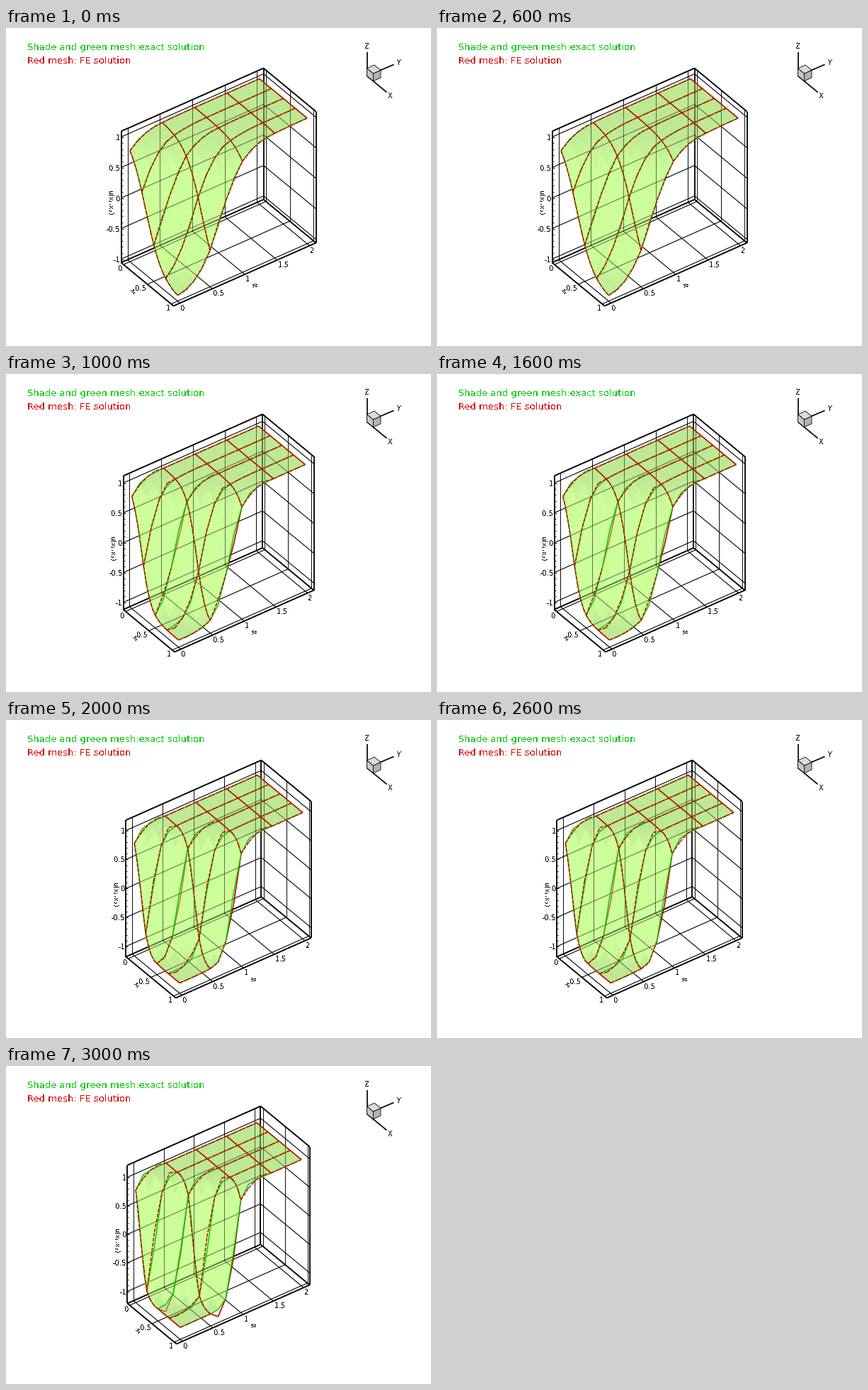
A matplotlib script for the animation above (4 s loop, 600 px wide and 448 px high).

```python
import numpy as np
import matplotlib.pyplot as plt
from matplotlib.animation import FuncAnimation
from matplotlib.collections import LineCollection, PolyCollection

WIDTH, HEIGHT, DPI = 600, 448, 64
PX = 72 / DPI
RED, GREEN = (0.84, 0, 0), (0, 0.8, 0)
SHADE = np.array([0.6, 1.0, 0.2])
DASHES = (0, (3.5, 1.2))

# steepness of the front, view scale, middle of the vertical range
STATES = [(3, 1.0, 0.018), (5, 0.978, 0), (7, 0.95, 0), (9, 0.935, 0)]
X1_LIMITS, X2_LIMITS = (-0.05, 1.05), (-0.1, 2.1)
X1_TICKS, X2_TICKS = np.linspace(0, 1, 3), np.linspace(0, 2, 5)
Z_TICKS = np.linspace(-1, 1, 5)

plt.rcParams["font.family"] = "DejaVu Sans"
plt.rcParams["text.antialiased"] = False

fig = plt.figure(figsize=(WIDTH / DPI, HEIGHT / DPI), dpi=DPI, facecolor="white")
ax = fig.add_axes([0, 0, 1, 1])


def make_projection(scale, z_mid):
    """Return the 3D-to-pixel mapping and the vertical limits of the box."""
    height = 335 - 150 * scale
    left = 299.5 - 137.5 * scale
    middle = 391 - 61 * scale - height / 2

    def project(x1, x2, z):
        u, v = x1 - X1_LIMITS[0], x2 - X2_LIMITS[0]
        x = left + scale * (67.3 * u + 91.4 * v)
        y = middle + scale * (55.5 * u - 40.4 * v - 86 * (z - z_mid))
        return np.stack(np.broadcast_arrays(x, y), axis=-1)

    half = height / (172 * scale)
    return project, (z_mid - half, z_mid + half)


def lines(segments, color, width, zorder, style="solid", alpha=1):
    if len(segments):
        ax.add_collection(LineCollection(
            segments, colors=[color], linewidths=width * PX, linestyles=style,
            alpha=alpha, zorder=zorder, capstyle="butt"))


def label(x, y, text, size=10, color="black", **kwargs):
    kwargs.setdefault("va", "baseline")
    ax.text(x, y, text, fontsize=size * PX, color=color, zorder=9, **kwargs)


def quadratic(values):
    """Piecewise quadratic through the ends and middle of each element."""
    a, m, b = values[:-1:4], values[2::4], values[4::4]
    result = values.copy()
    result[1::4] = 0.375 * a + 0.75 * m - 0.125 * b
    result[3::4] = -0.125 * a + 0.75 * m + 0.375 * b
    return result


def draw_box(project, z_limits):
    (a0, a1), (b0, b1), (z0, z1) = X1_LIMITS, X2_LIMITS, z_limits

    def edge(p, q):
        return [project(*p), project(*q)]

    grid = []
    for t in X1_TICKS:
        grid += [edge((t, b1, z0), (t, b1, z1)), edge((t, b0, z0), (t, b1, z0))]
    for t in X2_TICKS:
        grid += [edge((a0, t, z0), (a0, t, z1)), edge((a0, t, z0), (a1, t, z0))]
    for t in Z_TICKS:
        grid += [edge((a0, b0, t), (a0, b1, t)), edge((a0, b1, t), (a1, b1, t))]

    frame = [edge((a0, b0, z0), (a1, b0, z0)), edge((a1, b0, z0), (a1, b1, z0)),
             edge((a0, b0, z0), (a0, b1, z0)), edge((a0, b1, z0), (a1, b1, z0)),
             edge((a0, b0, z1), (a0, b1, z1)), edge((a0, b1, z1), (a1, b1, z1))]
    frame += [edge((a, b, z0), (a, b, z1)) for a, b in ((a0, b0), (a0, b1), (a1, b1))]

    # the second, fainter pass shows through the surface
    for zorder, alpha in ((1, 1), (3.5, 0.6)):
        lines(grid, "black", 0.9, zorder, alpha=alpha)
        lines(frame, "black", 1.7, zorder, alpha=alpha)

    ticks = []
    for i in range(-10, 11):
        p = project(a0, b0, i / 10)
        ticks.append([p, p + (3 if i % 5 == 0 else 2, 0)])
    lines(ticks, "black", 0.9, 1)

    for t in Z_TICKS:
        x, y = project(a0, b0, t)
        label(x - 1, y + 4, f"{t:g}", ha="right")
    for t in X1_TICKS:
        x, y = project(t, b0, z0)
        label(x - 1, y + 9, f"{t:g}", ha="right")
    for t in X2_TICKS:
        x, y = project(a1, t, z0)
        label(x + 1, y + 10, f"{t:g}", ha="left")

    centred = dict(ha="center", va="center")
    x, _ = project(a0, b0, 0)
    label(x - 15, 245, "u(x$_1$,x$_2$)", 9, rotation=-90, **centred)
    x, y = project(0.5, b0, z0)
    label(x - 20, y + 11.5, "x$_1$", 8, rotation=-39, **centred)
    x, y = project(a1, 1, z0)
    label(x + 15.5, y + 16.5, "x$_2$", 8, rotation=24, **centred)


def draw_surface(project, steepness):
    x1, x2 = np.meshgrid(np.linspace(0, 1, 17), np.linspace(0, 2, 17), indexing="ij")
    exact = np.tanh(1 - steepness * (x1 - x2))
    points = project(x1, x2, exact)

    quads = np.stack([points[:-1, :-1], points[1:, :-1],
                      points[1:, 1:], points[:-1, 1:]], axis=2).reshape(-1, 4, 2)
    centre = (exact[:-1, :-1] + exact[1:, 1:]) / 2
    slope = steepness * (1 - centre ** 2)
    light = 0.82 + 0.18 * np.clip(slope / 2, 0, 1).ravel()
    ax.add_collection(PolyCollection(
        quads, facecolors=(1 + light[:, None] * SHADE) / 2, edgecolors="face",
        linewidths=0.6 * PX, zorder=3))

    below, above = [], []
    for i in range(0, 17, 4):
        for line, across in ((np.s_[i, :], True), (np.s_[:, i], False)):
            lines([points[line]], GREEN, 1.5, 4)
            approx = quadratic(exact[line])
            path = project(x1[line], x2[line], approx)
            error = approx - exact[line]
            for j in range(16):
                hidden = across and error[j] + error[j + 1] < -0.07
                (below if hidden else above).append(path[j:j + 2])
    lines(below, RED, 1.5, 2)
    lines(below, RED, 1.5, 3.7, alpha=0.6)
    lines(above, RED, 1.5, 5, DASHES)


def draw_triad():
    origin = np.array([509, 67])
    e1, e2, up = np.array([9, 7.3]), np.array([10.5, -4.8]), np.array([0, -10.5])
    lines([[origin, (509, 33)], [origin, (547, 51)], [origin, (537, 90)]],
          "black", 1.7, 6)
    faces = [(origin + up, e1, e2, "0.86"), (origin, e1, up, "0.78"),
             (origin + e1, e2, up, "0.7")]
    for corner, s, t, gray in faces:
        ax.add_patch(plt.Polygon(
            [corner, corner + s, corner + s + t, corner + t], facecolor=gray,
            edgecolor="black", linewidth=0.8 * PX, zorder=7))
    for x, y, name in ((509, 28, "Z"), (555, 51.5, "Y"), (542, 98, "X")):
        label(x, y, name, ha="center")


def update(index):
    steepness, scale, z_mid = STATES[index]
    ax.clear()
    ax.set(xlim=(-0.5, WIDTH - 0.5), ylim=(HEIGHT - 0.5, -0.5))
    ax.axis("off")
    project, z_limits = make_projection(scale, z_mid)
    draw_box(project, z_limits)
    draw_surface(project, steepness)
    draw_triad()
    label(29, 30, "Shade and green mesh:exact solution", 13.1, GREEN)
    label(29, 49, "Red mesh: FE solution", 13.1, RED)
    return []


animation = FuncAnimation(fig, update, frames=len(STATES), interval=1000,
                          init_func=lambda: [], repeat=True, repeat_delay=0)
plt.show()
```
